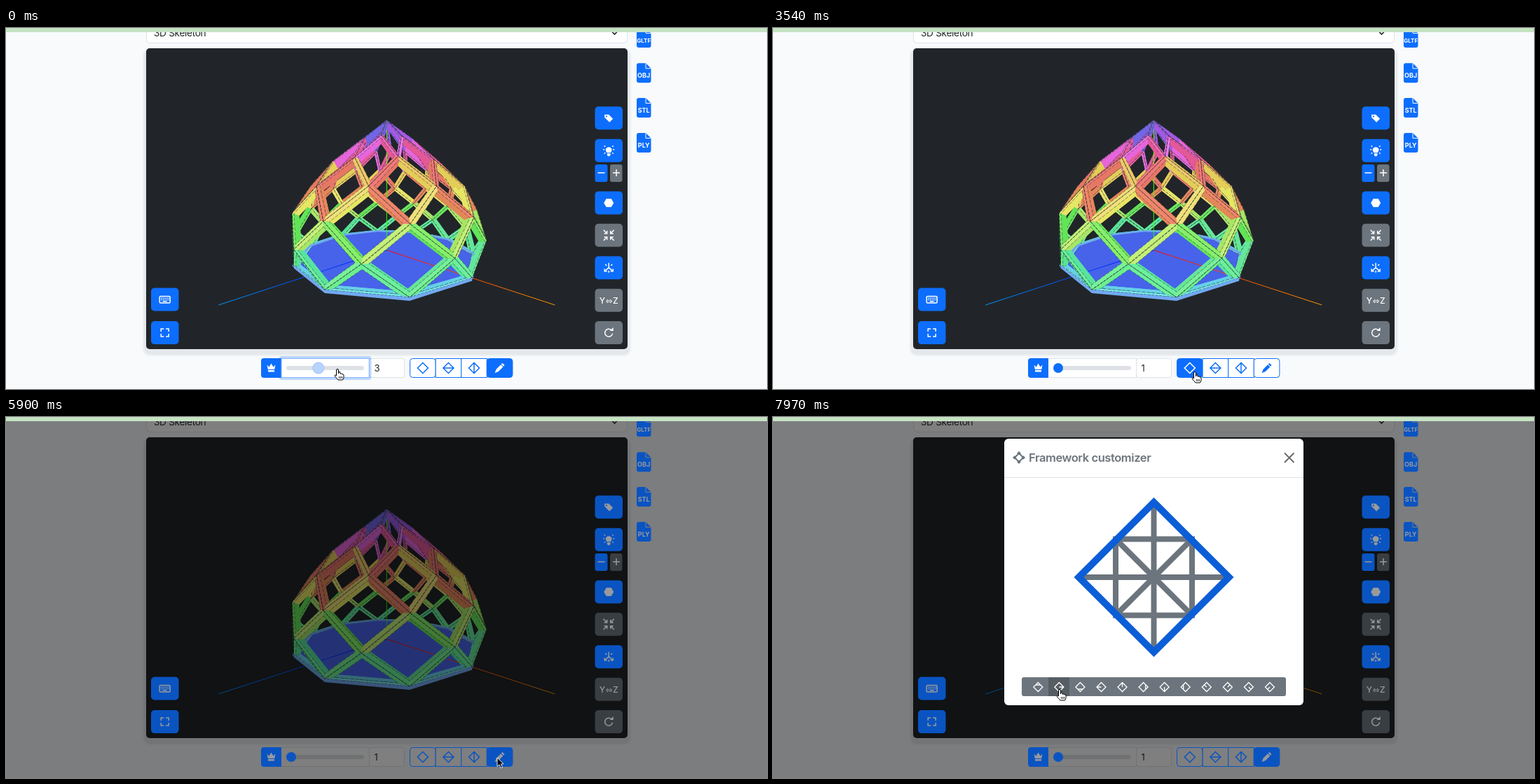
Write an HTML page with a canvas that moves like this. It is 1086 by 516 pixels and loops after 8000 ms.

```html
<!DOCTYPE html>
<html lang="en">
<head>
<meta charset="utf-8">
<title>Framework customizer</title>
<style>
html, body { margin: 0; width: 100%; height: 100%; overflow: hidden; }
body {
  --page: #f8fafc; --blue: #0d6efd; --gray: #6c757d; --icon: #fff;
  --box: #fff; --line: #dee2e6; --ink: #212529;
  background: var(--page);
}
body.dim {
  --page: #7c7d7e; --blue: #0a54c2; --gray: #393e43; --icon: #989a9c;
  --box: #7f7f7f; --line: #6f7173; --ink: #15171a;
}
#view {
  position: absolute; left: 200px; top: 29px; width: 687px; height: 430px;
  background: #212529; border-radius: 5px; box-shadow: 0 5px 3px 4px #e5e8ea;
}
.dim #view { filter: brightness(.5); }
svg { position: absolute; left: 0; top: 0; font-family: Inter, "Noto Sans", sans-serif; }
.blue { fill: var(--blue); }
.gray { fill: var(--gray); }
.icon { fill: var(--icon); }
.pen { fill: none; stroke: var(--icon); stroke-width: 1.5; }
.box { fill: var(--box); stroke: var(--line); }
.ink { fill: var(--ink); }
.tight { letter-spacing: -.025em; }
.opt rect { fill: var(--box); stroke: var(--blue); }
.opt path { fill: none; stroke: var(--blue); stroke-width: 1.5; }
.opt .solid { fill: var(--blue); stroke: none; }
.opt.on rect { fill: var(--blue); }
.opt.on path { stroke: var(--icon); }
.opt.on .solid { fill: var(--icon); stroke: none; }
.opt.fade path { stroke: #0a58ca; }
</style>
</head>
<body>
<canvas id="view" width="687" height="430"></canvas>
<svg id="ui" width="1086" height="516" viewBox="0 0 1086 516"></svg>
<script>
const $ = id => document.getElementById(id);
const rad = d => d * Math.PI / 180;

// ---------- dome: a ten-sided polar zonohedron, cut at level 6 ----------
const ctx = $('view').getContext('2d');
const size = 182, radius = 126;
const hues = [[238, 265], [298, 325], [0, 42], [52, 12], [82, 108], [136, 142]];
const cam = { dist: 277, up: 73.5, sin: .062, cos: .998 };
const eye = [
  cam.dist * cam.cos - cam.up * cam.sin, 0, cam.dist * cam.sin + cam.up * cam.cos];

// Points are [towards viewer, right, up].
const ringPoint = (k, deg) => {
  const r = radius * Math.sin(rad(18 * k));
  return [r * Math.cos(rad(deg)), r * Math.sin(rad(deg)), size * (1 - k / 6)];
};
const project = ([u, w, h]) => {
  const m = 1 / (1 - (u * cam.cos + h * cam.sin) / cam.dist);
  return [343.3 + w * m, 215 + (cam.up + u * cam.sin - h * cam.cos) * m];
};
const sub = (a, b) => a.map((v, i) => v - b[i]);
const dot = (a, b) => a.reduce((s, v, i) => s + v * b[i], 0);
const mix = (a, b, t) => a.map((v, i) => v + (b[i] - v) * t);
const shrink = p => p.map(v => v * .955);
const cross = (a, b) => [
  a[1] * b[2] - a[2] * b[1], a[2] * b[0] - a[0] * b[2], a[0] * b[1] - a[1] * b[0]];

function trace(points) {
  ctx.beginPath();
  points.forEach(p => ctx.lineTo(...project(p)));
  ctx.closePath();
}
function fill(points, color) {
  trace(points);
  ctx.fillStyle = color;
  ctx.fill();
}
function outline(points, width, dash) {
  trace(points);
  ctx.setLineDash(dash);
  ctx.lineWidth = width;
  ctx.strokeStyle = 'rgba(22,32,30,.75)';
  ctx.stroke();
  ctx.setLineDash([]);
}

function makeFace(k, deg) {
  const base = k === 6;
  const outer = [ringPoint(k - 1, deg), ringPoint(k, deg + 18), ringPoint(k, deg - 18)];
  const hue = [hues[k - 1][1], 182, hues[k - 1][0]];
  if (!base) {
    outer.splice(2, 0, ringPoint(k + 1, deg));
    hue.splice(1, 1, hues[k][0], hues[k][1]);
  }
  const mid = [0, 1, 2].map(i => outer.reduce((s, p) => s + p[i], 0) / outer.length);
  let normal = cross(sub(outer[1], outer[0]), sub(outer[2], outer[0]));
  if (dot(normal, sub(mid, [0, 0, 50])) < 0) normal = normal.map(v => -v);
  const toEye = sub(eye, mid);
  return {
    outer, hue, base, front: dot(normal, toEye) > 0, far: Math.hypot(...toEye),
    hole: outer.map(p => mix(p, mid, base ? .25 : .15))
  };
}

function drawFace({ outer, hole, hue, base, front }) {
  const n = outer.length;
  const band = (a, b, sat, light, shift) => hue.forEach((h, i) => {
    const j = (i + 1) % n;
    const lift = i % 2 ? 2 : -1;
    fill([a[i], a[j], b[j], b[i]], `hsl(${h + shift},${sat}%,${light + lift}%)`);
  });
  const inOuter = outer.map(shrink), inHole = hole.map(shrink);
  const skin = () => {
    band(outer, hole, 80, 69, 0);
    outline(outer, 1, [4, 1.5]);
    outline(hole, .6, [5, 2]);
  };
  const lining = () => {
    band(inOuter, inHole, 74, 66, 6);
    outline(inOuter, .7, [4, 2]);
  };
  const layers = [lining, () => band(hole, inHole, 72, 63, 8), skin];
  (front ? layers : layers.reverse()).forEach(f => f());
  if (base && front) {
    const low = p => [p[0], p[1], -3];
    fill([outer[1], outer[2], low(outer[2]), low(outer[1])], '#72a9f2');
  }
}

function axis(end, from, to) {
  const a = project([0, 0, 0]), b = project(end);
  const g = ctx.createLinearGradient(...a, ...b);
  g.addColorStop(0, from);
  g.addColorStop(1, to);
  ctx.strokeStyle = g;
  ctx.lineWidth = 1;
  ctx.beginPath();
  ctx.moveTo(...a);
  ctx.lineTo(...b);
  ctx.stroke();
}

function drawDome() {
  const faces = [];
  for (let k = 1; k <= 6; k++)
    for (let j = 0; j < 10; j++) faces.push(makeFace(k, (k % 2 ? 9 : 27) + 36 * j));
  faces.sort((a, b) => b.far - a.far);
  faces.filter(f => !f.front).forEach(drawFace);

  const rim = [...Array(10)].map((_, j) => ringPoint(6, 9 + 36 * j));
  trace(rim);
  ctx.strokeStyle = '#6ea8f0';
  ctx.lineWidth = 3;
  ctx.stroke();
  fill(rim.map(shrink), '#4763e9');
  const side = size * Math.SQRT1_2;
  axis([side, side, 0], '#f00', '#f90');
  axis([0, 0, size], '#0f0', '#9f0');
  axis([side, -side, 0], '#00f', '#09f');

  faces.filter(f => f.front).forEach(drawFace);
}

// ---------- interface ----------
const rect = (x, y, w, h, r, attrs) =>
  `<rect x="${x}" y="${y}" width="${w}" height="${h}" rx="${r}" ${attrs}/>`;
const at = (x, y, body, attrs = '') => `<g transform="translate(${x} ${y})" ${attrs}>${body}</g>`;
const pen = d => `<path class="pen" d="${d}"/>`;
const solid = d => `<path class="icon" d="${d}"/>`;
const button = (x, y, kind, icon) =>
  rect(x, y, 39.5, 33, 5, `class="${kind}"`) + at(x + 19.7, y + 16.5, icon);
const gem = r => `M0 ${-r}L${r} 0 0 ${r} ${-r} 0z`;
const spin = (n, d) => [...Array(n)].map((_, i) =>
  `<path class="pen" d="${d}" transform="rotate(${i * 360 / n})"/>`).join('');

const icons = {
  tag: solid('M-6-5H0L6 1 1 6-6-1z') + '<circle class="blue" cx="-3.3" cy="-2.4" r="1.1"/>',
  bulb: solid('M-2.6 3C-6-1-4-5 0-5S6-1 2.6 3zM-2.3 4H2.3V6.5L1 8H-1L-2.3 6.5z') +
    pen('M-8-1.5H-6M8-1.5H6M-6.5-7-5-5.5M6.5-7 5-5.5M-6.5 4.5-5 3M6.5 4.5 5 3'),
  hexagon: solid('M-7 0-3.5-6H3.5L7 0 3.5 6H-3.5z'),
  shrink: spin(4, 'M7.5 7.5 2.5 2.5M2.5 6.5V2.5H6.5'),
  axes: pen('M0 0V-7M0 0-6 5M0 0 6 5M-6 1.5V5H-2.5M6 1.5V5H2.5M-5-5-3-3M5-5 3-3M0 4V7'),
  swap: '<text class="icon" y="4.8" font-size="12" font-weight="500" text-anchor="middle">Y<tspan font-size="8" dy="-1">⇔</tspan><tspan dy="1">Z</tspan></text>',
  turn: pen('M3.6-4A5.5 5.5 0 1 0 5.4 1') + solid('M1.5-2.5H6.5V-7.5z'),
  keys: rect(-7.5, -4.5, 15, 9.5, 1.5, 'class="pen"') +
    '<path class="pen" stroke-dasharray="1.4 1.2" d="M-5.5-1.8H6M-5.5.4H6"/>' + pen('M-3 2.8H3'),
  full: spin(4, 'M-5.5-1.5V-5.5H-1.5')
};

const fileIcon = (y, name) => at(900, y,
  '<path class="blue" d="M3 0H13L20.5 7.5V25Q20.5 28 17.5 28H3Q0 28 0 25V3Q0 0 3 0z"/>' +
  '<path fill="none" stroke="var(--page)" d="M13 0V7.5H20.5"/>' +
  `<text class="icon" x="10.2" y="20.6" font-size="${name.length > 3 ? 8 : 9}" font-weight="700" text-anchor="middle">${name}</text>`);

const optionIcons = [
  `<path d="${gem(7.5)}"/>`,
  `<path d="${gem(7.5)}M-7.5 0H7.5"/>`,
  `<path d="${gem(7.5)}M0-7.5V7.5"/>`,
  '<path class="solid" transform="translate(-7 -7) scale(.87)" d="M12.5 0 16 3.5 14.2 5.5 10.5 1.8zM9.8 2.5 13.5 6.2 6 13.7 0 16 2.3 10z"/>'
];
const options = optionIcons.map((icon, i) => at(576.5 + 36.6 * i, 472.5,
  rect(0, 0, 36.6, 27, i % 3 ? 0 : 4, '') + at(18.3, 13.5, icon), 'class="opt"')).join('');

const strokes = [
  'M-3-3H3', 'M0 0H6', 'M-3 3H3', 'M0 0H-6', 'M0 0V-6', 'M3-3V3',
  'M0 0V6', 'M-3-3V3', 'M0 0-3-3', 'M0 0 3-3', 'M0 0 3 3', 'M0 0-3 3'];
const picks = strokes.map((d, i) => at(378.3 + 30.06 * i, 386,
  `<path fill="none" stroke="#fff" stroke-width="1.3" d="${gem(6.5)}${d}"/>`)).join('');

const knots = [0, 90, 180, 270].map(a =>
  `<path fill="#6c757d" transform="rotate(${a}) translate(0 -6.2)" d="${gem(2.8)}"/>`).join('');
const modal =
  rect(330, 31, 427, 381, 6, 'fill="#fff"') +
  '<path stroke="#dee2e6" d="M330 86.5H757"/>' +
  at(351, 58, `<path fill="none" stroke="#6c757d" stroke-width="2" d="${gem(6.2)}"/>${knots}`) +
  '<text class="tight" x="365" y="64" font-size="16.5" font-weight="600" fill="#6c757d">Framework customizer</text>' +
  '<path stroke="#666" stroke-width="1.8" stroke-linecap="round" d="M730.5 52l12.5 12.5m0-12.5-12.5 12.5"/>' +
  at(543.5, 229,
    '<path fill="none" stroke="#6c757d" stroke-width="8" d="M-104 0H104M0-104V104M-54.5-54.5H54.5V54.5H-54.5zL54.5 54.5M54.5-54.5-54.5 54.5"/>' +
    `<path fill="none" stroke="#0b5ed7" stroke-width="10" d="${gem(107)}"/>`) +
  rect(355, 372, 377, 27, 3, 'fill="#6c757d"') +
  rect(363, 372, 30, 27, 0, 'id="hover" fill="#565e64"') + picks;

$('ui').innerHTML =
  rect(200.5, -12, 686, 33.5, 5, 'class="box"') +
  '<text class="ink tight" x="211" y="11.5" font-size="13.7">3D Skeleton</text>' +
  '<path fill="none" stroke="var(--ink)" stroke-width="1.6" d="M864.5 5l4 4 4-4"/>' +
  [['GLTF', 0], ['OBJ', 50.3], ['STL', 100], ['PLY', 150]].map(([n, y]) => fileIcon(y, n)).join('') +
  button(840.5, 112.3, 'blue', icons.tag) +
  button(840.5, 158.8, 'blue', icons.bulb) +
  rect(840.5, 195, 18, 25, 3, 'class="blue"') + rect(862, 195, 17.5, 25, 3, 'class="gray"') +
  pen('M844.5 207H854.5M866 207H876M871 202V212') +
  button(840.5, 233.4, 'blue', icons.hexagon) +
  button(840.5, 279.8, 'gray', icons.shrink) +
  button(840.5, 326.2, 'blue', icons.axes) +
  button(840.5, 372.7, 'gray', icons.swap) +
  button(840.5, 419.1, 'gray', icons.turn) +
  button(207, 371.5, 'blue', icons.keys) +
  button(207, 419.1, 'blue', icons.full) +
  rect(518.5, 472.5, 50, 27, 3, 'class="box"') +
  rect(392.5, 472.5, 126, 27, 0, 'class="box"') +
  '<path class="blue" d="M393 472H368Q364 472 364 476V496Q364 500 368 500H393z"/>' +
  solid('M372.5 481.5 375.5 484.5 378.5 479.5 381.5 484.5 384.5 481.5 383.2 488H373.8zM374 489H383V491.5H374z') +
  `<g id="glow">${rect(391.5, 471, 128, 30, 2, 'fill="none" stroke="#0d6efd" stroke-opacity=".25" stroke-width="4"')}${rect(393, 472.5, 125.5, 27, 0, 'fill="none" stroke="#86b7fe"')}</g>` +
  rect(400, 483, 111, 6, 3, 'fill="var(--line)"') +
  '<circle id="thumb" cy="486" r="7"/>' +
  '<text id="value" class="ink" x="525.5" y="490.5" font-size="13"></text>' +
  options +
  `<g id="modal">${modal}</g>` +
  '<g id="hand"><path fill="#fff" stroke="#000" d="M-1.5 9V1A1.5 1.5 0 0 1 1.5 1V6Q3-.6 4.3 6.3 5.8 5.4 6.9 6.8 8.7 6.3 9 8.2V11Q9 13 7.5 15H1Q-.8 13-3.4 10-4.4 8.3-3.2 7.8-2.4 7.6-1.5 9z"/><path stroke="#000" stroke-width=".8" d="M2.5 10V13M4.5 10V13M6.5 10V13"/></g>' +
  '<path id="arrow" fill="#000" stroke="#fff" stroke-width=".9" d="M0 0V12.5L3 9.8 5.2 14.6 7.4 13.6 5.2 9 9 8.7z"/>' +
  rect(0, 0, 1086, 6, 0, 'fill="#c5e3c2"');

// ---------- timeline ----------
const loop = 8000, tick = 147.3;
const path = [ // tick, x, y
  [0, 473, 488], [8, 412, 489], [9, 402, 490], [10, 420, 487], [14, 701, 468],
  [16, 692, 485], [17, 685, 487], [21, 583, 487], [22, 583, 487], [24, 602, 492],
  [26, 628, 488], [28, 628, 488], [30, 660, 488], [32, 660, 488], [36, 701, 487],
  [44, 701, 487], [52, 376, 391], [53, 385, 391], [54, 409, 390]];

function pointer(n) {
  const i = path.findIndex(p => p[0] >= n);
  if (i <= 0) return path[i < 0 ? path.length - 1 : 0].slice(1);
  const a = path[i - 1], b = path[i];
  return mix(a, b, (n - a[0]) / (b[0] - a[0])).slice(1);
}
// Number of given ticks already passed.
const stage = (n, ...marks) => marks.filter(m => n >= m).length;
const show = (id, on) => { $(id).style.display = on ? '' : 'none'; };

function render(n) {
  const value = 3 - stage(n, 5, 9);
  $('value').textContent = value;
  $('thumb').setAttribute('cx', 407 + (value - 1) * 19.4);
  $('thumb').setAttribute('r', n < 10 ? 8 : 7);
  $('thumb').style.fill = n < 10 ? '#b6d4fe' : 'var(--blue)';
  $('thumb').style.stroke = n < 10 ? '#9fc2f5' : 'none';
  show('glow', n < 23);

  const active = [3, 0, 1, 2, 3][stage(n, 23, 29, 33, 40)];
  document.querySelectorAll('.opt').forEach((el, i) => {
    el.classList.toggle('on', i === active);
    el.classList.toggle('fade', i === 2 && n >= 38 && n < 40);
  });

  document.body.classList.toggle('dim', n >= 40);
  show('modal', n >= 41);
  $('modal').setAttribute('transform', `translate(0 ${n < 42 ? -13.7 : 0})`);
  show('hover', n >= 53);
  $('hover').setAttribute('x', n < 54 ? 363 : 393);

  const arrow = n >= 36 && n < 53;
  show('arrow', arrow);
  show('hand', !arrow);
  $(arrow ? 'arrow' : 'hand').setAttribute('transform', `translate(${pointer(n)})`);
}

let last = -1;
const start = performance.now();
function frame() {
  const t = (performance.now() - start) % loop;
  const n = Math.floor((t + 8) / tick);
  if (n !== last) render(last = n);
  requestAnimationFrame(frame);
}
drawDome();
frame();
</script>
</body>
</html>
```
